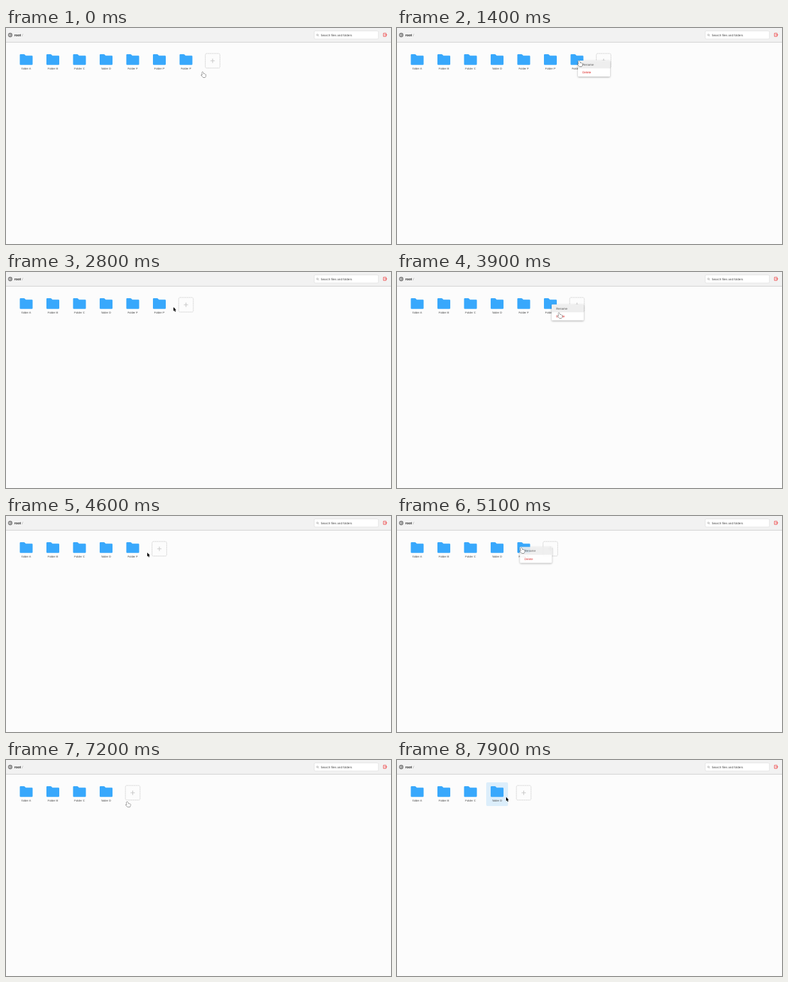
An HTML page that plays this animation: 600 px wide and 338 px high, repeating every 8 s.

```html
<!DOCTYPE html>
<html lang="en">
<head>
<meta charset="utf-8">
<title>File manager</title>
<style>
  html, body { margin: 0; width: 100%; height: 100%; overflow: hidden; background: #fcfcfc; }
  svg { display: block; width: 100%; height: 100%; font: 4.7px "Liberation Sans", Arial, sans-serif; text-rendering: geometricPrecision; }
  .label { font-size: 4.3px; text-anchor: middle; fill: #444; }
  .line { fill: none; stroke-linecap: round; stroke-linejoin: round; }
  .menu { filter: drop-shadow(0 1px 1.5px rgba(0, 0, 0, .32)); }
</style>
</head>
<body>
<svg viewBox="0 0 600 338">
  <rect width="600" height="338" fill="#fcfcfc"/>
  <rect width="600" height="22" fill="#f2f2f2"/>
  <rect y="21.8" width="600" height=".9" fill="#cbcbcb"/>
  <circle cx="6.6" cy="11" r="3.4" fill="#858585"/>
  <path class="line" d="M8.3 11H5M6.4 9.6L5 11l1.4 1.4" stroke="#f2f2f2" stroke-width=".7"/>
  <text x="12.9" y="13" font-size="5.4" font-weight="bold" fill="#222">root</text>
  <text x="25" y="13" font-size="5.4" fill="#999">/</text>
  <rect x="480.3" y="4.6" width="100" height="12.6" rx="1.6" fill="#fff" stroke="#ddd" stroke-width=".7"/>
  <g class="line" stroke="#888" stroke-width=".5"><circle cx="485.2" cy="10.8" r="1.3"/><path d="M486.2 11.8l1.2 1.2"/></g>
  <text x="490.4" y="12.6" fill="#444">Search files and folders</text>
  <path class="line" d="M592.3 9V8.2H588.2V13.2H592.3V12.4M590.2 10.7H593.4M592.3 9.7l1.1 1-1.1 1" stroke="#f0393b" stroke-width=".8"/>
  <g id="scene"></g>
</svg>
<script>
const scene = document.getElementById('scene');
const names = ['folder A', 'Folder B', 'Folder C', 'folder D', 'Folder F', 'Folder P', 'Folder P'];
const deletions = [2300, 4200, 6000];
// open time, close time, left, top
const menus = [[1100, 2300, 282, 51], [3300, 4200, 241, 50.8], [5100, 6000, 191.5, 48.4]];
// pointer path: time, x, y
const path = [
  [0, 306.5, 69], [500, 284, 52], [1600, 284, 52], [2100, 295, 68],
  [2400, 295, 68], [2800, 261, 55], [3100, 242.5, 52], [3500, 242.5, 52],
  [3900, 252.5, 64], [4100, 255, 67], [4200, 255, 67], [4900, 194, 50],
  [5300, 194, 50], [5700, 202, 66], [6000, 202, 66], [6400, 199.5, 64],
  [6600, 199.5, 64], [7000, 164, 56], [7400, 214, 75], [7500, 214, 75], [7900, 170, 58]
];

const slot = i => 31.5 + 41.5 * i;
const over = ([x, y], i) => Math.abs(x - slot(i)) < 17 && y > 35 && y < 72;

function pointer(t) {
  const i = path.findIndex(p => p[0] >= t);
  if (i < 1) return path[0].slice(1);
  const [t0, x0, y0] = path[i - 1], [t1, x1, y1] = path[i];
  const u = (t - t0) / (t1 - t0);
  return [x0 + (x1 - x0) * u, y0 + (y1 - y0) * u];
}

const folder = (name, i, lit) => `<g transform="translate(${slot(i)})">
  ${lit ? '<rect x="-17" y="35" width="34" height="37" rx="2" fill="#dceefb"/>' : ''}
  <path d="M-10 42.3q0-1.3 1.3-1.3h5q.8 0 1.4.6l1.6 1.6h9.4q1.3 0 1.3 1.3v12q0 1.3-1.3 1.3h-17.4q-1.3 0-1.3-1.3z" fill="#38a8fc"/>
  <text class="label" y="64.8">${name}</text></g>`;

const addTile = i => `<g class="line" transform="translate(${slot(i)} 51.3)" stroke="#c8c8c8">
  <rect x="-11.4" y="-11.4" width="22.8" height="22.8" rx="2" stroke-width=".7" stroke-dasharray="1.5 1.3"/>
  <path d="M-2.9 0H2.9M0-2.9V2.9" stroke-width="1.1"/></g>`;

const menuBox = (x, y, alpha, hover) => `<g class="menu" transform="translate(${x} ${y})" opacity="${alpha}">
  <rect width="50" height="25" rx="1.3" fill="#fff"/>
  <rect y=".3" width="50" height="12" fill="#eee"/>
  ${hover ? '<rect y="12.3" width="50" height="12.2" fill="#f4f4f4"/>' : ''}
  <text x="6.9" y="7.9" fill="#555">Rename</text>
  <text x="6.9" y="20.4" fill="#d9201e">Delete</text></g>`;

const hand = 'M-1.2 1Q-1.2-.2 0-.1Q.7 0 .9 1L1.4 3Q2.1 2.3 2.7 3.1Q3.4 2.6 3.9 3.4Q5 3.1 5 4.3L4.7 6.5L4 8.1H.4L-2.3 5.1Q-2.5 4-1.4 4.2L-.5 4.9Z';
const arrow = 'M0 0V6.1L1.4 4.9L2.4 7.3L3.5 6.8L2.5 4.5H4.3Z';

function draw(t) {
  const count = names.length - deletions.filter(d => t >= d).length;
  const menu = menus.find(m => t >= m[0] && t < m[1]);
  const at = pointer(t);
  let out = names.slice(0, count).map((n, i) => folder(n, i, !menu && over(at, i))).join('') + addTile(count);
  if (menu) out += menuBox(menu[2], menu[3], Math.min(1, .9 + (t - menu[0]) / 1000), at[1] > menu[3] + 14);
  const isHand = menu || over(at, count);
  out += `<path transform="translate(${at})" d="${isHand ? hand : arrow}" fill="${isHand ? '#fff' : '#000'}"
    stroke="${isHand ? '#222' : '#fff'}" stroke-width="${isHand ? .8 : .5}" stroke-linejoin="round" paint-order="stroke"/>`;
  scene.innerHTML = out;
}

let last = -1;
function tick() {
  const t = Math.floor(performance.now() % 8000 / 100) * 100;
  if (t !== last) draw(last = t);
  requestAnimationFrame(tick);
}
tick();
</script>
</body>
</html>
```
